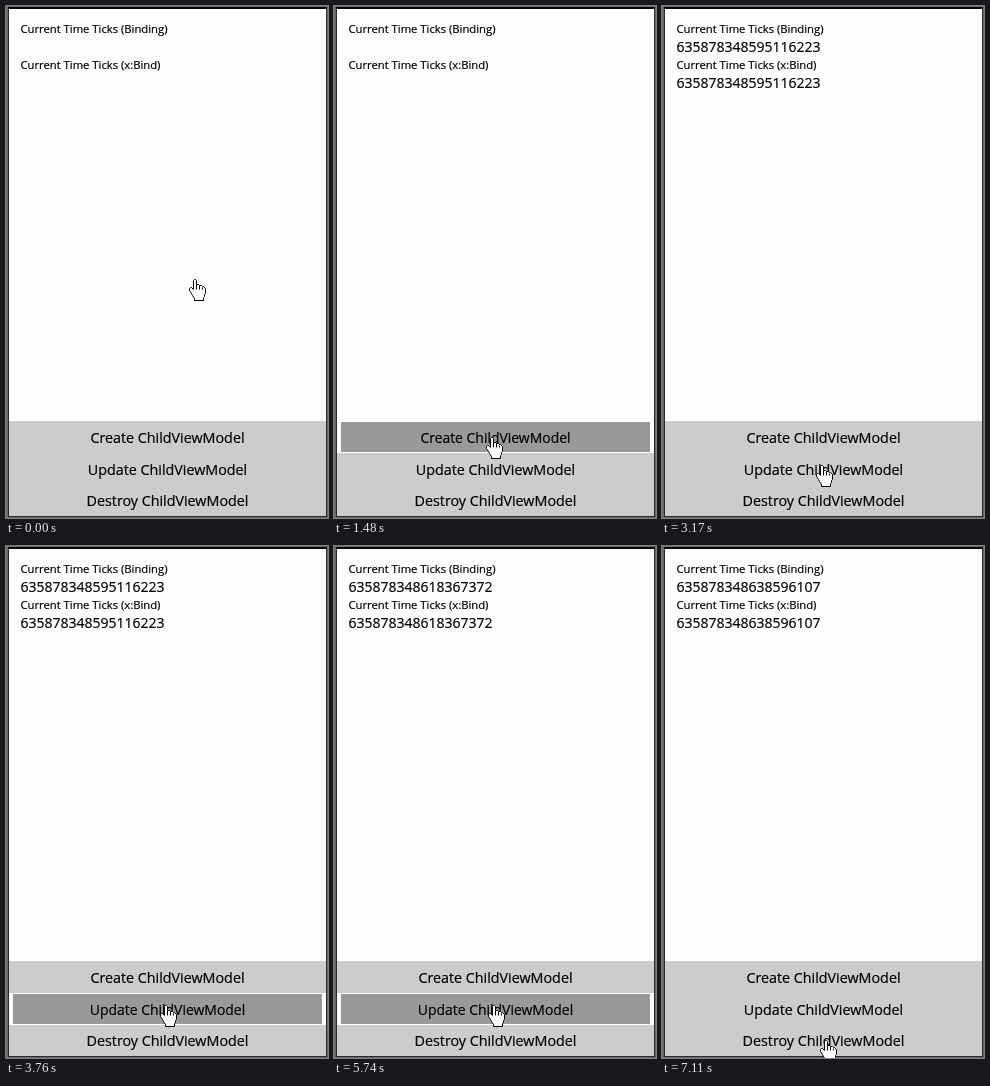
An HTML page with a canvas that plays this animation: 322x512 px, repeating every 8000 ms.

```html
<!DOCTYPE html>
<html lang="en">
<head>
<meta charset="utf-8">
<title>Binding demo</title>
<style>
  html, body { margin: 0; width: 100%; height: 100%; overflow: hidden; background: #fff; }
  canvas { display: block; width: 322px; height: 512px; }
</style>
</head>
<body>
<canvas id="stage" width="322" height="512"></canvas>
<script>
const ctx = document.getElementById('stage').getContext('2d');
const LOOP = 8000;
const FONT = '"Open Sans", "Noto Sans", sans-serif';
const NORMAL = '#cccccc', PRESSED = '#999999';

// Each track lists [start time, values...]; a value holds until the next start.
const cursorTrack = [
  [0, 183, 273], [500, 160, 350], [620, 152, 389], [780, 152, 403],
  [920, 152, 418], [1050, 152, 431], [2900, 152, 433], [3050, 153, 448],
  [3170, 154, 459], [6870, 155, 468], [6990, 157, 482], [7110, 158, 494]
];
const ticksTrack = [
  [0, ''], [1760, '635878348595116223'],
  [3910, '635878348618367372'], [6040, '635878348638596107']
];
// Button state: inset from the full width, fill
const idle = [0, 0, NORMAL];
const buttons = [
  { label: 'Create ChildViewModel', top: 415, height: 32,
    track: [idle, [1480, 4, PRESSED], [1760, 4, NORMAL], [1910, 1, NORMAL], [2040, 0, NORMAL]] },
  { label: 'Update ChildViewModel', top: 447, height: 32,
    track: [idle, [3760, 4, PRESSED], [3910, 4, NORMAL], [4190, 1, NORMAL], [4330, 0, NORMAL],
      [5740, 4, PRESSED], [6040, 1, NORMAL], [6170, 0.5, NORMAL], [6310, 0, NORMAL]] },
  { label: 'Destroy ChildViewModel', top: 479, height: 31, track: [idle] }
];

const hand = new Path2D('M5 0H6L7 1V5H9L10 6H12L13 7H14L16 9V14L15 15V17L14 18V21H5V19L3 16L2 14L0 11V9L1 8H2L4 10V1Z');
const knuckles = new Path2D('M7 5V10M10 6V10M13 8V10');

function at(track, t) {
  let state = track[0];
  for (const step of track) if (step[0] <= t) state = step;
  return state.slice(1);
}

function rect(x, y, w, h, fill) {
  ctx.fillStyle = fill;
  ctx.fillRect(x, y, w, h);
}

// A hairline stroke gives the text its slightly heavier weight.
function text(str, x, y, size, align = 'left') {
  ctx.font = `${size}px ${FONT}`;
  ctx.textAlign = align;
  ctx.fillStyle = ctx.strokeStyle = '#000';
  ctx.lineWidth = 0.2;
  ctx.fillText(str, x, y);
  ctx.strokeText(str, x, y);
}

function drawWindow() {
  rect(0, 0, 322, 512, '#6a6a6a');
  rect(2, 1, 319, 510, '#2b2b2b');
  rect(2, 1, 318, 2, '#000');
  rect(3, 3, 317, 507, '#fefefe');
}

function drawButton({ label, top, height, track }, t) {
  const [inset, fill] = at(track, t);
  const dy = inset / 4;
  const scale = 1 - 2 * inset / 317;
  rect(3 + inset, top + dy, 317 - 2 * inset, height - 2 * dy, fill);
  ctx.save();
  ctx.translate(161.5, top + height / 2);
  ctx.scale(scale, scale);
  text(label, 0, 5.5 + dy / 2, 14.3, 'center');
  ctx.restore();
}

function drawCursor(x, y) {
  ctx.save();
  ctx.translate(x + 0.5, y + 0.5);
  ctx.fillStyle = '#fff';
  ctx.strokeStyle = '#000';
  ctx.lineWidth = 1;
  ctx.fill(hand);
  ctx.stroke(hand);
  ctx.stroke(knuckles);
  ctx.restore();
}

function draw(t) {
  drawWindow();
  const [ticks] = at(ticksTrack, t);
  text('Current Time Ticks (Binding)', 14.5, 27, 11.25);
  text(ticks, 14.5, 46, 14);
  text('Current Time Ticks (x:Bind)', 14.5, 63, 11.25);
  text(ticks, 14.5, 82, 14);
  buttons.forEach(button => drawButton(button, t));
  drawCursor(...at(cursorTrack, t));
}

const start = performance.now();
function tick() {
  draw((performance.now() - start) % LOOP);
  requestAnimationFrame(tick);
}
tick();
</script>
</body>
</html>
```
